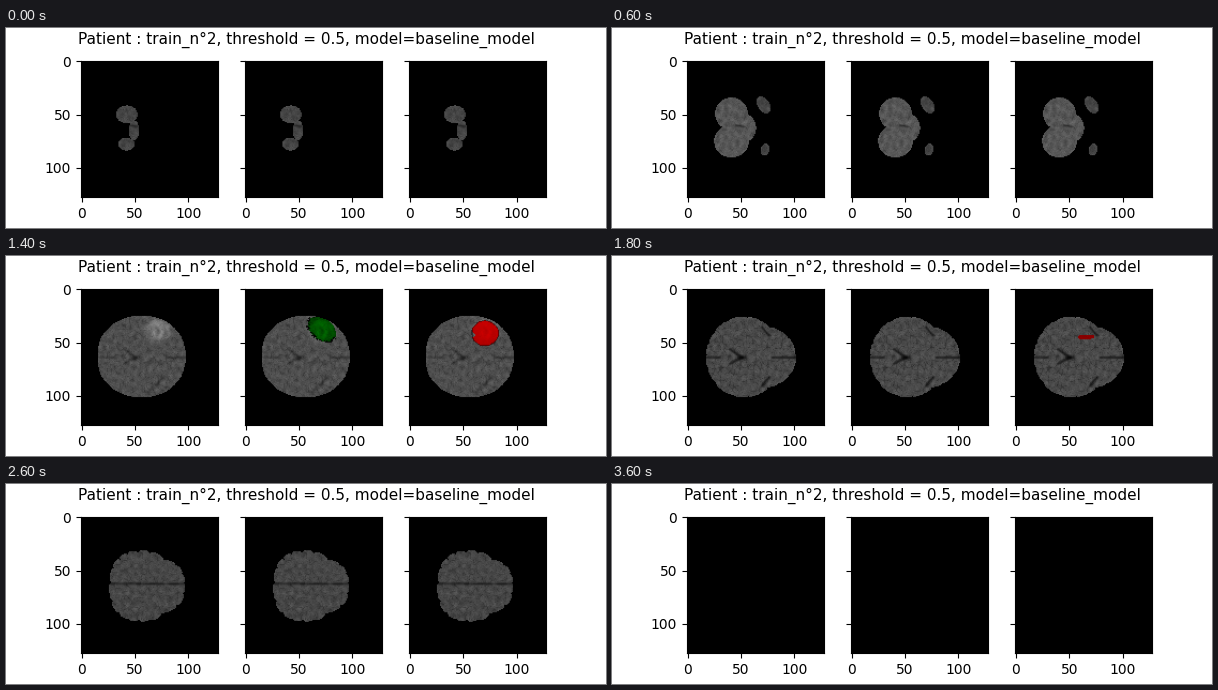
A matplotlib script for the animation above (4000 ms loop, 600 by 200 pixels).

```python
import numpy as np
import matplotlib.pyplot as plt
from matplotlib.animation import FuncAnimation

N, SLICES, STEP_MS = 128, 20, 200
EMPTY_FROM = 18
CELL = 136.765 / N
X, Y = np.meshgrid(75 + (np.arange(N) + .5) * CELL,
                   32.62 + (np.arange(N) + .5) * CELL)
MID_Y = 101

# Extent of the tissue at a few slices, interpolated in between
KEYS = [0, 3, 5, 7, 9, 13, 15, 16, 17]
LEFT = [110, 102, 94, 92, 94, 103, 111, 115, 137]
TOP = [78, 70, 60, 60, 61, 67, 76, 81, 92]
RIGHT = [133, 144, 165, 180, 184, 179, 170, 159, 148]
BOTTOM = [123, 130, 140, 142, 142, 138, 129, 123, 109]

# Upper, lower and middle part as ellipses: cx, cy, rx, ry, tilt
STEM = np.array([(121, 87, 10.5, 9, 0), (120.5, 117, 8, 6.5, 0),
                 (128, 103, 5, 10, 0)])
BASE = np.array([(120, 87, 16, 16, 0), (120, 114, 17, 16, 0),
                 (132, 101, 12, 14, 0)])
LOBES = np.array([(130, 80, 36, 17, -8), (130, 121, 36, 17, 8),
                  (117, 101, 12, 12, 0)])
WHOLE = np.array([(132, 101, 38, 40.5, 0), (132, 101, 38, 40.5, 0),
                  (150, 101, 34, 31, 0)])

rng = np.random.default_rng(4)
WAVES = [(rng.uniform(.4, 1), rng.uniform(0, 2 * np.pi),
          rng.uniform(-.6, .6), rng.uniform(0, 2 * np.pi)) for _ in range(30)]


def field(z):
    """Smooth noise of about unit variance that drifts from slice to slice."""
    total = sum(np.cos(f * (X * np.cos(a) + Y * np.sin(a)) + v * z + p)
                for f, a, v, p in WAVES)
    return total / np.sqrt(len(WAVES) / 2)


def radius(cx, cy, rx, ry, tilt=0, power=2, x=X, y=Y):
    """Relative distance from the centre: 1 on the rim of the ellipse."""
    c, s = np.cos(np.radians(tilt)), np.sin(np.radians(tilt))
    u, v = x - cx, y - cy
    return (np.abs((u * c + v * s) / rx) ** power
            + np.abs((v * c - u * s) / ry) ** power) ** (1 / power)


def parts_at(k):
    if k < 3:
        return STEM + (BASE - STEM) * k / 3
    if k == 3:
        return BASE
    t = np.clip((k - 5) / 4, 0, 1)
    return LOBES + (WHOLE - LOBES) * (1 - (1 - t) ** 2)


def extent(parts):
    cx, cy, rx, ry, tilt = parts.T
    c, s = np.cos(np.radians(tilt)), np.sin(np.radians(tilt))
    w, h = np.hypot(rx * c, ry * s), np.hypot(rx * s, ry * c)
    return (cx - w).min(), (cy - h).min(), (cx + w).max(), (cy + h).max()


def tissue(k):
    """Mask of the slice: united ellipses fitted to its extent."""
    parts = parts_at(k)
    l0, t0, r0, b0 = extent(parts)
    l1, t1, r1, b1 = (np.interp(k, KEYS, side)
                      for side in (LEFT, TOP, RIGHT, BOTTOM))
    x = l0 + (X - l1) * (r0 - l0) / (r1 - l1)
    y = t0 + (Y - t1) * (b0 - t0) / (b1 - t1)
    power = np.interp(k, [9, 13], [2, 2.4])
    r = np.min([radius(*p, power, x, y) for p in parts], axis=0)
    # Narrow clefts around the rim, deeper toward the top
    angle = np.arctan2(Y - MID_Y, X - (l1 + r1) / 2)
    cleft = (1 - np.abs(np.sin(9 * angle + np.sin(3 * angle + k)))) ** 3
    return r < 1 - np.interp(k, [7, 13, 17], [0, .07, .15]) * cleft


def groove(img, x0, y0, x1, y1, width, depth):
    """Darken a soft line."""
    dx, dy = x1 - x0, y1 - y0
    t = np.clip(((X - x0) * dx + (Y - y0) * dy) / (dx * dx + dy * dy), 0, 1)
    d = np.hypot(X - x0 - t * dx, Y - y0 - t * dy)
    img *= 1 - depth * np.exp(-(d / width) ** 2)


def anatomy(img, k, n):
    if k <= 3:
        groove(img, 124, 98, 131, 99, 1.3, .4)
    ventricles = .6 * np.interp(k, [6, 8, 10, 13], [0, .9, 1, 0])
    for side in (-1, 1):
        groove(img, 118, MID_Y + 7 * side, 130, MID_Y + 1, 1.5, ventricles)
        groove(img, 150, MID_Y + 29 * side, 157, MID_Y + 21 * side, 1.4,
               ventricles)
    groove(img, 128, MID_Y + 1, 133, MID_Y + 1, 2, ventricles)
    for x0, x1 in ((94, 108), (160, 184)):
        groove(img, x0, MID_Y + 1, x1, MID_Y + 1, 1.1, ventricles)
    cleft = np.interp(k, [9, 13, 17], [0, .6, .65])
    groove(img, 98, 100, 181, 100.5, 1.2, cleft * (.8 + .2 * np.tanh(n)))


def slice_images(k):
    """Plain scan, scan with the true region, scan with the predicted one."""
    if k >= EMPTY_FROM:
        return [np.zeros((N, N, 3))] * 3
    noise = np.random.default_rng(100 + k)
    n = field(k)
    mask = tissue(k)
    img = np.interp(k, [0, 3, 9, 17], [.28, .345, .295, .27]) * (
        1 + .06 * field(k + 40))
    folds = np.interp(k, [0, 5, 9, 13, 15], [.1, .15, .25, .2, .55])
    img *= 1 - folds * np.exp(-(n / .22) ** 2)
    img += noise.normal(0, .016, img.shape)
    anatomy(img, k, n)

    if k == 3:
        knobs = np.minimum(radius(151.5, 77.5, 9.5, 6, 58),
                           radius(153, 122, 4.5, 6, 15)) < 1
        img[knobs] *= .8
        mask |= knobs
    if 4 <= k <= 6:
        core = radius(136.5, 101.5, 8, 8.5)
        img *= 1 - .6 * np.exp(-((core - 1.1) / .12) ** 2)
        mask |= core < 1

    # The tumour swells and shrinks over slices 3 to 9
    size = np.sqrt(max(0, np.sin(np.pi * (k - 3) / 6))) if 3 < k < 9 else 0
    if size:
        glow = radius(152, 74, 13 * size, 11 * size)
        img += .22 * size * np.exp(-glow ** 3) * (1 + .2 * n)
    img = np.clip(img, 0, 1) * mask

    plain = np.repeat(img[..., None], 3, axis=2)
    truth, guess = plain.copy(), plain.copy()

    def paint(target, region, channel, values):
        target[region] = 0
        target[region, channel] = values[region]

    if size:
        d = radius(152, 73.5, 17 * size, 11.5 * size, 38) / (1 + .03 * n)
        paint(truth, (d < 1) & mask, 1, .75 * img)
        rim = (d > .9) & (d < 1.1) & mask & (X - Y < 82)
        truth[rim & (noise.random((N, N)) < .55)] *= .12

        d = radius(151, 78, 14.5 * size, 13.5 * size) / (1 + .02 * n)
        notch = radius(137.5, 79.5, 4 * size, 3 * size) < 1
        paint(guess, (d < 1) & mask & ~notch, 0, .55 + .45 * img)
        guess[(d > .94) & (d < 1.03) & mask] *= .55
    if k == 9:
        streak = radius(146.5, 81.5, 8, 2.2, -3, 4) < 1
        paint(guess, streak & mask, 0, .4 + .5 * img)
    return plain, truth, guess


slices = [slice_images(k) for k in range(SLICES)]

fig, axes = plt.subplots(1, 3, figsize=(6, 2), dpi=100, sharey=True)
fig.suptitle("Patient : train_n°2, threshold = 0.5, model=baseline_model",
             fontsize=11)
views = [ax.imshow(img) for ax, img in zip(axes, slices[0])]
for ax in axes:
    ax.set_xticks([0, 50, 100])
    ax.set_yticks([0, 50, 100])


def update(k):
    for view, img in zip(views, slices[k]):
        view.set_data(img)
    return views


anim = FuncAnimation(fig, update, frames=SLICES, interval=STEP_MS,
                     repeat=True, repeat_delay=0)
plt.show()
```
